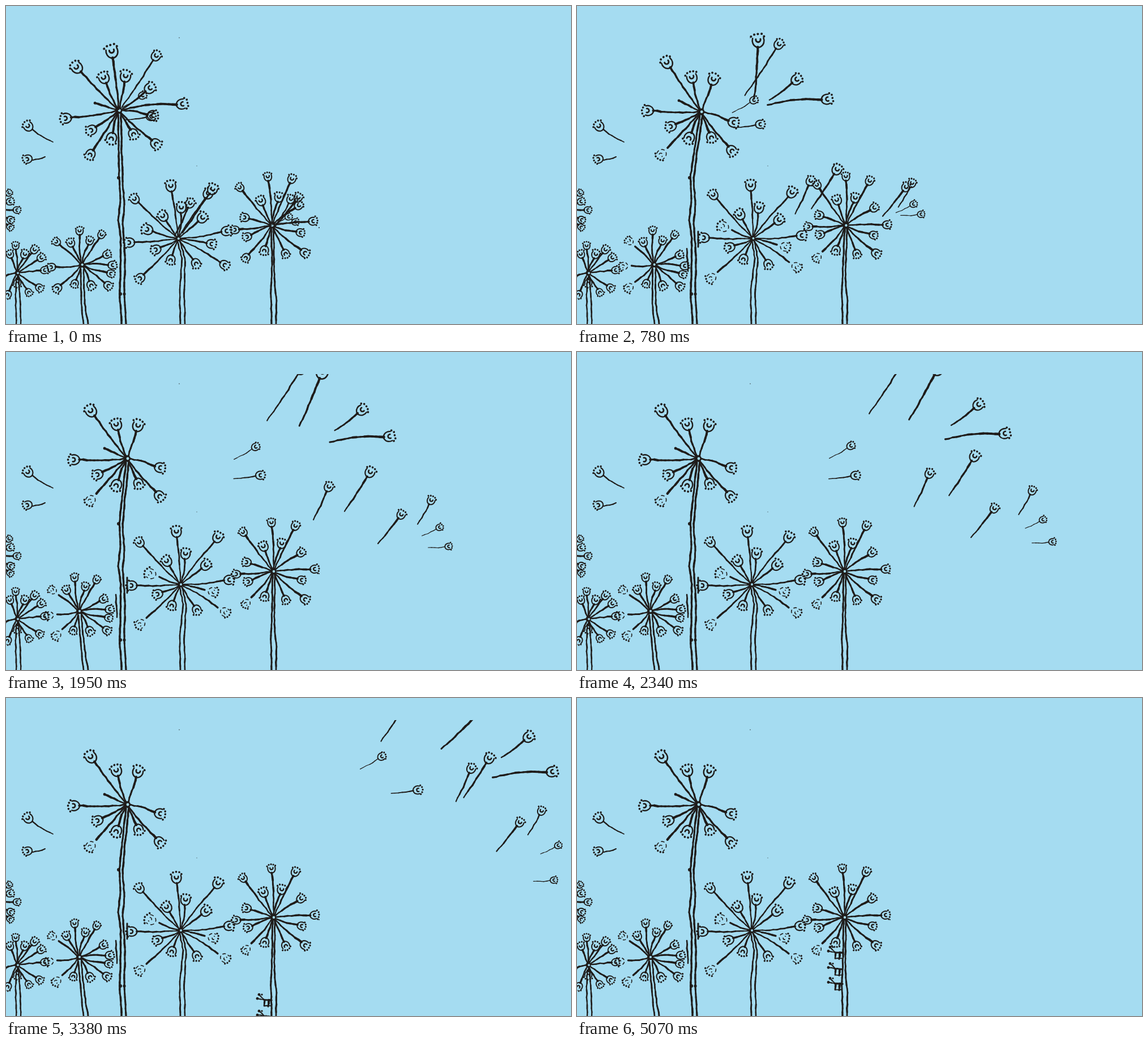
Write an HTML page with a canvas that moves like this. It is 998 by 561 pixels and loops after 5.2 s.

```html
<!DOCTYPE html>
<html lang="en">
<head>
<meta charset="utf-8">
<title>Seed heads in the wind</title>
<style>
  html, body { margin: 0; width: 100%; height: 100%; overflow: hidden; background: #a5dcf1; }
  canvas { display: block; }
</style>
</head>
<body>
<canvas id="stage" width="998" height="561"></canvas>
<script>
const ctx = document.getElementById('stage').getContext('2d');
const SKY = '#a5dcf1', INK = '#1f1c1a';
const LOOP = 5200, STEP = 130, TEAR = 390, CEILING = 39;

const noise = n => {
  const v = Math.sin(n * 12.9898 + 4.1) * 43758.5453;
  return v - Math.floor(v);
};
const mix = (a, b, u) => a + (b - a) * u;

// keys: [time, x, y, time, x, y, ...]; the last leg runs on past its end
function along(keys, t) {
  let i = 0;
  while (i + 6 < keys.length && t > keys[i + 3]) i += 3;
  const u = (t - keys[i]) / (keys[i + 3] - keys[i]);
  return [mix(keys[i + 1], keys[i + 4], u), mix(keys[i + 2], keys[i + 5], u)];
}

function dot(x, y, r, color = INK) {
  ctx.fillStyle = color;
  ctx.beginPath();
  ctx.arc(x, y, r, 0, 7);
  ctx.fill();
}

// Uneven pen line from a to b
function pen(a, b, w0, w1, id, bow = 0) {
  const dx = b[0] - a[0], dy = b[1] - a[1], len = Math.hypot(dx, dy) || 1;
  const n = Math.max(1, Math.ceil(len / 7));
  let [px, py] = a;
  for (let i = 1; i <= n; i++) {
    const u = i / n;
    const off = i < n ? bow * Math.sin(Math.PI * u) + (noise(id * 31 + i) - 0.5) * 1.3 : 0;
    const x = a[0] + dx * u - dy / len * off;
    const y = a[1] + dy * u + dx / len * off;
    ctx.lineWidth = mix(w0, w1, u) * (0.85 + 0.3 * noise(id * 17 + i));
    ctx.beginPath();
    ctx.moveTo(px, py);
    ctx.lineTo(x, y);
    ctx.stroke();
    px = x;
    py = y;
  }
}

function cup(x, y, r, angle, id, torn) {
  ctx.save();
  ctx.translate(x, y);
  ctx.rotate(angle + (noise(id) - 0.5) * 0.3);
  if (torn) ctx.setLineDash([r * 0.5, r * 0.55]);
  ctx.lineWidth = torn ? 1.6 : r * 0.13 + 0.9;
  ctx.beginPath();
  ctx.ellipse(0, 0, r * 0.92, r * 0.8, 0, Math.PI * 0.38, Math.PI * 1.62);
  ctx.stroke();
  ctx.lineWidth = torn ? 1.6 : r * 0.17 + 0.8;
  ctx.beginPath();
  ctx.arc(r * 0.12, 0, r * 0.32, Math.PI * 0.42, Math.PI * 1.58);
  ctx.stroke();
  for (let i = -2; i <= 2; i++) {
    const a = i * 0.47, d = r * (0.88 + 0.14 * noise(id + i * 7));
    dot(Math.cos(a) * d, Math.sin(a) * d * 1.15, r * 0.11 + 0.65);
  }
  ctx.restore();
}

// Sway k per flower: k[0] at rest before the gust, k[1] in the gust, 0 afterwards.
// heads and stems are placed as they stand after the gust.
const flowers = [
  { hub: [-30, 360], r: 7, w: 2.4, k: [0, 0], pivot: [0, 400], stems: [], torn: [],
    heads: [5, 330, 7, 345, 19, 360, 8, 377, 7, 390] },
  { hub: [20, 471], r: 8, w: 2.5, k: [0, 0], pivot: [20, 540], torn: [],
    stems: [[18, 480, 17, 515, 18, 561], [22, 480, 25, 520, 26, 561]],
    heads: [17, 423, 50, 430, 7, 438, 33, 438, 62, 444, 68, 466, 59, 497, 40, 505, 20, 489, 3, 509, -8, 478] },
  { hub: [129, 457], r: 8.5, w: 2.7, k: [0.07, 0.155], pivot: [138, 525], torn: [4, 11, 12],
    stems: [[128, 465, 133, 525, 137, 561], [133, 465, 139, 525, 145, 561]],
    heads: [121, 398, 160, 402, 107, 420, 140, 414, 82, 420, 172, 436, 183, 454, 181, 469,
      178, 491, 148, 492, 119, 491, 89, 500, 76, 465] },
  { hub: [214, 188], r: 11, w: 3.2, k: [-0.125, 0.07], pivot: [214, 305], lift: 30, torn: [8],
    stems: [[212, 195, 205, 255, 200, 303, 202, 340, 198, 378, 203, 410, 201, 508, 204, 561],
      [217, 195, 211, 250, 206, 303, 209, 350, 206, 385, 210, 440, 209, 508, 212, 561]],
    stub: [174, 170], fixed: 8,
    heads: [150, 104, 195, 128, 233, 130, 120, 190, 272, 204, 162, 216, 195, 235, 234, 232, 149, 262, 271, 254] },
  { hub: [308, 410], r: 10, w: 2.6, k: [-0.06, 0.055], pivot: [312, 480], torn: [6, 9, 12, 13],
    stems: [[307, 415, 313, 445, 307, 500, 308, 561], [311, 415, 318, 445, 315, 500, 316, 561]],
    heads: [301, 317, 374, 327, 317, 356, 353, 376, 284, 369, 236, 336, 255, 391, 222, 412,
      268, 427, 237, 480, 293, 447, 337, 455, 387, 459, 366, 423, 394, 402] },
  { hub: [472, 387], r: 9, w: 2.9, k: [-0.045, 0.065], pivot: [472, 445], torn: [10],
    stems: [[471, 392, 470, 450, 468, 500, 469, 561], [475, 392, 474, 480, 478, 520, 477, 561]],
    heads: [469, 301, 511, 307, 419, 318, 455, 343, 487, 338, 521, 354, 545, 383, 425, 371,
      407, 392, 428, 405, 424, 444, 457, 431, 494, 437, 528, 436, 522, 402] }
];

// Loose seeds: cup radius, line width, vector from tail to cup, path of the tail, turn in rad/s
const seeds = [];
const seed = (r, w, dx, dy, keys, spin = 0) => seeds.push({ r, w, dx, dy, keys, spin });
seed(13, 3.2, -12, -102, [130, 199, 182, 4030, 883, 71], 0.286);
seed(10, 2.4, 60, -90, [130, 205, 178, 4030, 754, 56]);
seed(11, 3, 48, -36, [130, 206, 181, 2860, 768, 117]);
seed(11, 3.2, 105, -10, [130, 206, 183, 2860, 755, 147]);
seed(8, 1.2, 38, -22, [130, 203, 180, 1170, 317, 193, 2680, 483, 186, 4030, 758, 69]);
seed(9, 1.6, 47, -6, [130, 209, 201, 1170, 317, 223, 2700, 484, 224, 4030, 868, 115]);
seed(10.5, 2.8, 45, -69, [130, 312, 400, 1950, 598, 281, 2860, 736, 216, 4030, 899, 125]);
seed(9.5, 2.4, 27, -58, [130, 298, 406, 1950, 543, 296, 2700, 644, 251, 4030, 939, 117]);
seed(9, 2.6, 41, -51, [130, 475, 389, 1950, 657, 338, 2700, 732, 317, 4030, 995, 226]);
seed(8.5, 2, 24, -42, [130, 479, 383, 2860, 851, 264]);
seed(7, 1.1, 31, -15, [130, 468, 387, 2860, 868, 293]);
seed(7, 1.2, 36, -2, [130, 475, 383, 2860, 881, 326, 4030, 995, 320]);

function sway([before, gust], t) {
  if (t <= 520) return mix(before, gust, (t - 130) / 390);
  const u = Math.min(1, Math.max(0, (t - 600) / 440));
  return gust * (1 - u * u * (3 - 2 * u));
}

function drawFlower(f, index, t) {
  const k = sway(f.k, t), [px, py] = f.pivot;
  const bend = (x, y) => {
    const h = Math.max(0, py - y), grip = Math.min(1, h / 40);
    return [x + k * h, y + (k * (x - px) - Math.abs(k) * (f.lift || 0)) * grip];
  };
  const hub = bend(...f.hub);
  const base = index * 100 + 1;

  f.stems.forEach((s, j) => {
    for (let i = 0; i + 3 < s.length; i += 2)
      pen(bend(s[i], s[i + 1]), bend(s[i + 2], s[i + 3]), f.w, f.w, base + 60 + j * 10 + i);
  });

  for (let i = 0; i < f.heads.length / 2; i++) {
    const x = f.heads[i * 2], y = f.heads[i * 2 + 1], id = base + i;
    const torn = t >= TEAR && f.torn.includes(i);
    const head = i === f.fixed ? [x, y] : bend(x, y);
    const angle = Math.atan2(head[1] - hub[1], head[0] - hub[0]);
    const r = f.r * (0.92 + 0.16 * noise(id + 5)), gap = r * 0.9 + (torn ? 7 : 0);
    const end = [head[0] - Math.cos(angle) * gap, head[1] - Math.sin(angle) * gap];
    pen(hub, end, f.w * 0.75, f.w * 1.2, id, (noise(id + 9) - 0.5) * 5);
    if (!torn) dot(...end, f.w * 0.75);
    cup(...head, r, angle, id, torn);
  }
  if (f.stub) {
    const tip = bend(...f.stub);
    pen(hub, tip, 2, 4, base + 50);
    dot(...tip, 2.4);
  }
  dot(...hub, f.w * 1.9);
  dot(hub[0] + 1, hub[1], f.w * 0.75, SKY);
}

function drawSeed(s, index, t) {
  const tail = along(s.keys, t);
  const angle = Math.atan2(s.dy, s.dx) + s.spin * (t - 130) / 1000;
  const len = Math.hypot(s.dx, s.dy), c = Math.cos(angle), n = Math.sin(angle);
  const reach = len - s.r * 0.9;
  const end = [tail[0] + c * reach, tail[1] + n * reach];
  pen(tail, end, s.w * 0.85, s.w * 1.25, 800 + index, index === 3 ? -4 : 1);
  dot(...end, s.w * 0.8);
  cup(tail[0] + c * len, tail[1] + n * len, s.r, angle, 800 + index);
}

// Small creature climbing the right-hand stem
function drawClimber(y, id) {
  pen([455, y], [469, y + 1], 3, 3, id);
  pen([457, y + 1], [456, y + 11], 3.5, 3, id + 1);
  pen([464, y + 1], [463, y + 12], 4, 3, id + 2);
  pen([457, y + 11], [468, y + 11], 2, 2, id + 3);
  for (const [x, dy] of [[447, -9], [444, -2]]) {
    pen([456, y], [x, y + dy], 2, 2, id + 4);
    dot(x, y + dy, 2.4);
  }
  dot(452, y - 9, 1.6);
}

function draw(t) {
  ctx.fillStyle = SKY;
  ctx.fillRect(0, 0, 998, 561);
  ctx.strokeStyle = INK;
  ctx.lineCap = 'round';

  dot(306, 56, 0.7);
  dot(337, 282, 0.6);
  dot(553, 391, 1);
  cup(39, 212, 10, -2.3, 700);
  pen([47, 218], [83, 240], 2.4, 1.8, 701, 2);
  cup(38, 270, 9, 2.9, 702);
  pen([47, 272], [58, 270], 2.2, 2, 703);
  pen([58, 270], [69, 266], 2, 2, 704);

  flowers.forEach((f, i) => drawFlower(f, i, t));
  for (const y of [303, 508]) dot(y < 400 ? 199 : 202, y, 3);
  dot(209, 508, 2.6);
  if (t >= TEAR) {
    pen([194, 428], [196, 468], 3, 2.4, 710);
    pen([214, 398], [214, 425], 2.6, 3, 711);
  }

  [500, 529, 555].forEach((y, i) => drawClimber(y - (t - 4030) * 0.0495, 900 + i * 10));

  ctx.save();
  ctx.beginPath();
  ctx.rect(0, CEILING, 998, 561);
  ctx.clip();
  seeds.forEach((s, i) => drawSeed(s, i, t));
  ctx.restore();
}

let shown = -1;
function tick() {
  const step = Math.floor(performance.now() % LOOP / STEP);
  if (step !== shown) {
    shown = step;
    draw(Math.max(1, step) * STEP);
  }
  requestAnimationFrame(tick);
}
tick();
</script>
</body>
</html>
```
